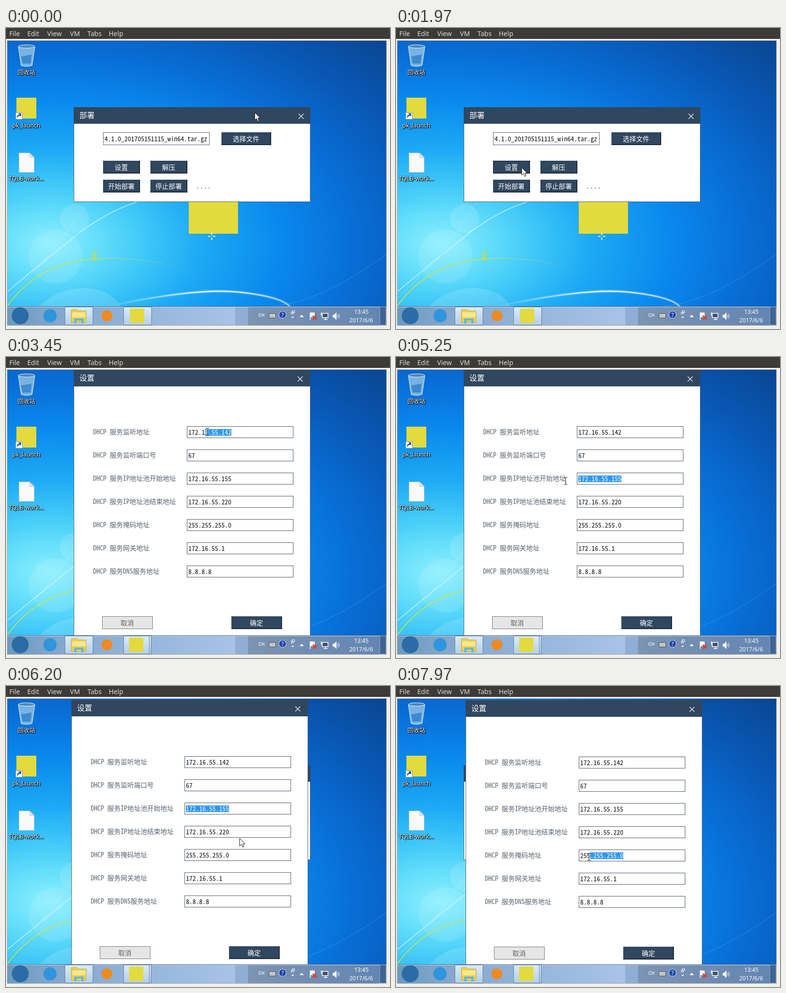
An HTML page for the animation above (8 s loop, 811 px wide and 635 px high).

```html
<!DOCTYPE html>
<html lang="zh-CN">
<head>
<meta charset="utf-8">
<title>部署</title>
<style>
html, body { margin: 0; width: 811px; height: 635px; overflow: hidden; background: #f1f0ee; }
svg { display: block; }
text { font: 14px "Noto Sans Mono CJK SC", "Noto Sans CJK SC", monospace; white-space: pre; }
.title { font-size: 16px; fill: #fff; }
.label { fill: #59636d; }
.value { fill: #111; }
.picked { fill: #fff; }
.mid { text-anchor: middle; }
.menu { font: 14px "Noto Sans", "Open Sans", sans-serif; fill: #dfdbd2; }
.icon { font: 12.5px "Noto Sans", "Noto Sans CJK SC", sans-serif; fill: #fff; text-anchor: middle; text-shadow: 1px 1px 1px #000, 1px 1px 2px #000, 0 0 2px #000; }
.clock { font: 12px "Noto Sans", "Open Sans", sans-serif; fill: #fff; text-anchor: middle; }
</style>
</head>
<body>
<svg id="stage" width="811" height="635" viewBox="0 0 811 635" xmlns="http://www.w3.org/2000/svg">
  <defs>
    <radialGradient id="sky" gradientUnits="userSpaceOnUse" cx="0" cy="0" r="620" gradientTransform="translate(92 455) scale(1.6 1)">
      <stop offset="0" stop-color="#8ceffd"/><stop offset=".1" stop-color="#66dffb"/>
      <stop offset=".2" stop-color="#40c9f8"/><stop offset=".32" stop-color="#1eaaf5"/>
      <stop offset=".48" stop-color="#0a8bee"/><stop offset=".64" stop-color="#086fd8"/>
      <stop offset=".82" stop-color="#0957b4"/><stop offset="1" stop-color="#0a4590"/>
    </radialGradient>
    <linearGradient id="bar">
      <stop offset="0" stop-color="#6d9abf"/><stop offset=".12" stop-color="#82a6cc"/>
      <stop offset=".4" stop-color="#98b8dd"/><stop offset=".6" stop-color="#a8c3e5"/>
    </linearGradient>
    <linearGradient id="tray"><stop offset="0" stop-color="#7d94b2"/><stop offset="1" stop-color="#6385b2"/></linearGradient>
    <linearGradient id="glass" x2="0" y2="1"><stop offset="0" stop-color="#dcebf7"/><stop offset="1" stop-color="#b2cfe9"/></linearGradient>
    <linearGradient id="fade"><stop offset="0" stop-color="#dbe63c"/><stop offset=".45" stop-color="#c8e05a"/><stop offset="1" stop-color="#7cc8e8" stop-opacity="0"/></linearGradient>
    <linearGradient id="glow"><stop offset="0" stop-color="#fff" stop-opacity="0"/><stop offset=".55" stop-color="#fff"/><stop offset="1" stop-color="#fff" stop-opacity=".6"/></linearGradient>
    <clipPath id="desk"><path d="M3 27H803V587H3Z"/></clipPath>
    <clipPath id="fileBox"><path d="M206 221H429V246H206Z"/></clipPath>
  </defs>

  <path fill="#f1f0ee" d="M0 0H811V635H0Z"/>
  <path fill="#3c3b37" d="M0 0H811V23H0Z"/>
  <g id="menu"></g>
  <path fill="none" stroke="#aaa8a4" d="M2.500 26.500H803.500V627.500H2.500Z"/>

  <g clip-path="url(#desk)">
    <path fill="url(#sky)" d="M3 27H803V587H3Z"/>
    <g fill="#fff">
      <circle cx="145" cy="402" r="31" opacity=".13"/>
      <circle cx="105" cy="482" r="57" opacity=".1"/>
      <path opacity=".14" d="M70 587Q110 548 165 549T242 587Z"/>
    </g>
    <g fill="none">
      <path d="M3 556Q70 500 145 440T300 360" stroke="#e4f9ff" stroke-width="1.500" opacity=".75"/>
      <path d="M3 570Q60 520 120 440T210 300" stroke="#e4f9ff" opacity=".3"/>
      <path d="M3 586Q70 494 187 487T400 518" stroke="url(#fade)" stroke-width="1.500"/>
      <g stroke="url(#glow)">
        <path d="M215 587Q400 548 490 557T600 588" stroke-width="7" opacity=".2"/>
        <path d="M215 587Q400 548 490 557T600 588" stroke-width="2.500"/>
      </g>
      <path d="M565 587Q660 580 803 478" stroke="#8fd0ff" opacity=".3"/>
      <path d="M187 470V494M180 475L194 490M194 474L180 489" stroke="#d5d93a" stroke-width="2" stroke-dasharray="4 2"/>
    </g>
    <path fill="#e3da3e" d="M386 332H490V434H386Z"/>
    <path stroke="#fff" stroke-width="2" d="M434.500 432V437M434.500 442V447M427 439.500H432M437 439.500H442"/>

    <path fill="#8dbfe6" fill-opacity=".85" stroke="#e9f5fc" d="M26 39H61L55 79Q43 83 32 79Z"/>
    <ellipse cx="43.500" cy="39" rx="17.500" ry="3.500" fill="#4f88bb" stroke="#eef8fd"/>
    <path fill="#2e7fcb" opacity=".8" d="M32 60L54 56 52 75H35Z"/>
    <path fill="#e3da3e" d="M22 147H64V191H22Z"/>
    <path fill="#fff" stroke="#889" d="M20.500 178.500H34.500V192.500H20.500Z"/>
    <path fill="#1d55a5" d="M23 190Q22 184 28 183L26 180H32V187L30 185Q25 186 23 190Z"/>
    <path fill="#fafafa" stroke="#b9c4cc" d="M27.500 263.500H50L59.500 273V304.500H27.500Z"/>
    <path fill="#dde3e8" stroke="#b9c4cc" d="M50 263.500V273H59.500Z"/>
    <text class="icon" x="43" y="98">回收站</text>
    <text class="icon" x="43" y="210">pk_launch</text>
    <text class="icon" x="43" y="322">TQLB-work...</text>

    <g id="main"></g>
    <g id="settings"></g>
  </g>

  <g id="taskbar">
    <path fill="url(#bar)" d="M3 587H803V627H3Z"/>
    <path fill="#90aed4" d="M484 588H511V627H484Z"/>
    <path fill="url(#tray)" d="M511 588H789V627H511Z"/>
    <path stroke="#c5d9ec" d="M3 588.500H803"/><path stroke="#4e6a8a" d="M3 587.500H803"/>
    <path fill="#3f648f" stroke="#8fabc9" d="M789.500 588.500H802.500V626.500H789.500Z"/>
    <circle cx="30" cy="607" r="18" fill="#2c6ca6"/>
    <circle cx="93" cy="607" r="14" fill="#2f95dc"/>
    <circle cx="213" cy="607" r="11.500" fill="#ee8a20"/>
    <path fill="url(#glass)" stroke="#5f7f9f" d="M124.500 588.500H183.500V626.500H124.500Z"/>
    <path fill="#ecd04c" stroke="#c9a637" d="M138 594H150L153 597H169V621H138Z"/>
    <path fill="#f8e88b" d="M140 600H168V610H140Z"/>
    <path fill="#65b4e4" d="M144 613H164V623H159V617H149V623H144Z"/>
    <g id="stack"><path fill="url(#glass)" stroke="#5f7f9f" d="M290 588.500H306.500V626.500H290Z"/></g>
    <path id="appButton" fill="url(#glass)" stroke="#5f7f9f"/>
    <path id="appIcon" fill="#e3da3e" d="M262 592H292V622H262Z"/>

    <text x="533" y="609" fill="#fff" style="font:11px 'Liberation Mono',monospace">CH</text>
    <path fill="#d8dde2" stroke="#444" d="M555.500 602.500H569.500V611.500H555.500Z"/>
    <path stroke="#555" stroke-dasharray="1 1" d="M557 605.500H568M557 608.500H568"/>
    <circle cx="584" cy="605" r="7.500" fill="#1d43a8" stroke="#d6e0f0"/>
    <text class="clock" x="584" y="609.500" font-weight="700">?</text>
    <path fill="none" stroke="#fff" d="M604.500 596.500H609.500V600.500H604.500ZM602.500 599.500H606.500V603.500H602.500Z"/>
    <path fill="#fff" d="M602.500 609H608.500L605.500 612ZM620 610H629L624.500 605Z"/>
    <path stroke="#fff" stroke-width="1.500" fill="#f5f5f5" d="M642.500 616V601H651V609H643"/>
    <path stroke="#df3c2c" stroke-width="3" d="M648 607L656 615M656 607L648 615"/>
    <path fill="#40536b" stroke="#fff" stroke-width="1.500" d="M668 602H680V611H668ZM671 615H679M675 611V615M666 600V607"/>
    <path fill="#fff" d="M690 605H693L698 600V616L693 611H690Z"/>
    <path fill="none" stroke="#fff" d="M700 605Q702 608 700 611M702 603Q705.500 608 702 613"/>
    <text class="clock" x="750.500" y="603">13:45</text>
    <text class="clock" x="750" y="621">2017/6/6</text>
  </g>

  <path id="arrow" fill="#fff" stroke="#111" d="M.5 .5V16.500L4 13 7 19 9.500 18 7 12H12Z"/>
  <g id="beam" fill="none">
    <path stroke="#fff" stroke-width="3" opacity=".6" d="M0-7V7"/>
    <path stroke="#111" d="M-3.500-7.500H-1L0-6.500 1-7.500H3.500M-3.500 7.500H-1L0 6.500 1 7.500H3.500M0-7V7"/>
  </g>
</svg>

<script>
const LOOP = 8000, NAVY = '#30475f', CHAR = 7;
const $ = id => document.getElementById(id);

const text = (x, y, s, cls, extra = '') => `<text x="${x}" y="${y}" class="${cls}" ${extra}>${s}</text>`;
const rect = (x, y, w, h, fill, extra = '') => `<rect x="${x}" y="${y}" width="${w}" height="${h}" fill="${fill}" ${extra}/>`;
const box = (x, y, w, h, fill, stroke) => rect(x + .5, y + .5, w - 1, h - 1, fill, `stroke="${stroke}"`);

function button(x, y, w, label) {
  return rect(x, y, w, 27, '#0c1722') + rect(x, y, w - 1, 26, '#223445') +
    rect(x, y, w - 2, 25, NAVY) + text(x + w / 2 - .5, y + 19, label, 'title mid', 'style="font-size:14px"');
}

function dialog(x, y, h, title, closeX) {
  return box(x, y, 500, h, '#fff', '#566472') + rect(x, y, 500, 35, NAVY) +
    text(x + 12, y + 23, title, 'title') +
    `<path stroke="#e8f2fa" stroke-width="1.300" d="M${closeX - 5} ${y + 14}l10.500 10.500m0-10.500l-10.500 10.500"/>`;
}

const fields = [
  ['监听地址', '172.16.55.142'], ['监听端口号', '67'], ['IP地址池开始地址', '172.16.55.155'],
  ['IP地址池结束地址', '172.16.55.220'], ['掩码地址', '255.255.255.0'],
  ['网关地址', '172.16.55.1'], ['DNS服务地址', '8.8.8.8']
];
const rowY = row => 146 + 49 * row;

$('menu').innerHTML = [['File', 7], ['Edit', 45], ['View', 87], ['VM', 135], ['Tabs', 172], ['Help', 217]]
  .map(([s, x]) => text(x, 17, s, 'menu')).join('');

$('main').innerHTML = dialog(143, 167, 200, '部署', 623) +
  box(205, 220, 225, 27, '#fff', '#566472') +
  `<g clip-path="url(#fileBox)">${text(201, 239, 'r4.1.0_201705151115_win64.tar.gz', 'value')}</g>` +
  button(455, 220, 105, '选择文件') + button(205, 280, 78, '设置') + button(305, 280, 78, '解压') +
  button(205, 320, 78, '开始部署') + button(305, 320, 78, '停止部署') +
  text(401, 339, '....', 'label', 'style="font-size:16px"') +
  `<g id="pressed">${box(205, 280, 78, 27, 'none', '#0c1722')}</g>`;

$('settings').innerHTML = dialog(143, 27, 610, '设置', 621) +
  fields.map(([name, value], i) => text(184, rowY(i) + 17, 'DHCP 服务' + name, 'label') +
    box(382, rowY(i), 225, 25, '#fff', '#4d5a67') + text(385, rowY(i) + 18, value, 'value')).join('') +
  '<g id="selection"></g>' +
  box(203, 547, 107, 27, '#e8e6e4', '#70777d') + text(256, 566, '取消', 'label mid') +
  button(476, 547, 107, '确定');

// Pointer and window paths: time, x, y
const pointerPath = [
  [0, 525, 178], [40, 525, 178], [110, 527, 190], [280, 512, 255], [440, 496, 303], [590, 496, 303],
  [620, 492, 299], [680, 501, 303], [940, 501, 303], [1160, 410, 310], [1350, 300, 302], [1470, 264, 294],
  [2900, 266, 293], [3050, 370, 215], [3230, 483, 157], [3450, 425, 157], [3760, 348, 156],
  [3900, 375, 185], [4150, 500, 262], [4240, 504, 264], [4340, 490, 261], [4540, 490, 261],
  [5250, 358, 261], [5340, 356, 261], [5390, 362, 263], [5740, 498, 319], [5780, 498, 319],
  [5960, 461, 318], [6070, 461, 318], [6160, 487, 320], [6290, 507, 323], [6370, 502, 322],
  [6440, 502, 322], [6680, 478, 306], [7110, 478, 306], [7380, 400, 307], [7600, 475, 340],
  [7720, 505, 358], [7810, 486, 360], [7890, 456, 360], [7970, 407, 360], [8000, 400, 360]
];
const windowPath = [[0, 0, 0], [5780, 0, 0], [5960, -37, -1], [6070, -37, -1], [6160, -11, 1], [6290, 9, 4], [6370, 4, 3]];

const selections = [
  { row: 0, down: 3230, drag: 3230, up: 3760, end: 4300 },
  { row: 2, down: 4300, drag: 4540, up: 5340, end: 6690 },
  { row: 3, down: 6690, drag: 7110, up: 7380, end: 7800 },
  { row: 4, down: 7800, drag: 7800, up: LOOP, end: LOOP }
];

function along(path, t) {
  const next = path.findIndex(p => p[0] > t);
  if (next < 0) return path[path.length - 1].slice(1);
  const [a, b] = [path[next - 1], path[next]];
  const k = (t - a[0]) / (b[0] - a[0]);
  return [a[1] + (b[1] - a[1]) * k, a[2] + (b[2] - a[2]) * k];
}

function drawSelection(sel, t, dx) {
  if (!sel) return '';
  const value = fields[sel.row][1], y = rowY(sel.row);
  const pointerX = along(pointerPath, Math.min(t, sel.up) - 12)[0];
  const column = Math.floor((pointerX - dx - 388) / CHAR);
  const start = t < sel.drag ? value.length : Math.max(0, Math.min(value.length, column));
  const x = 385 + start * CHAR;
  if (start === value.length) return rect(x, y + 6, 1, 14, '#111');
  return rect(x, y + 6, (value.length - start) * CHAR, 14, '#2f98f3') + text(x, y + 18, value.slice(start), 'picked');
}

const show = (id, on) => $(id).setAttribute('visibility', on ? 'visible' : 'hidden');

function render(t) {
  const [px, py] = along(pointerPath, t).map(Math.round);
  const [dx, dy] = along(windowPath, t).map(Math.round);

  const open = Math.max(0, Math.min(1, (t - 2100) / 220));
  const ease = 1 - (1 - open) ** 2, scale = .9 + .1 * ease;
  show('settings', open > 0);
  $('settings').setAttribute('opacity', ease);
  $('settings').setAttribute('transform', open < 1
    ? `translate(393 327) scale(${scale}) translate(-393 -327)` : `translate(${dx} ${dy})`);

  const sel = selections.find(s => t >= s.down && t < s.end);
  $('selection').innerHTML = drawSelection(sel, t, dx);

  const stacked = t >= 2200;
  show('pressed', t >= 1970 && t < 2110);
  show('stack', stacked);
  $('appButton').setAttribute('d', `M248.500 588.500H${stacked ? 302.5 : 307.5}V626.500H248.500Z`);
  $('appIcon').setAttribute('transform', `translate(${stacked ? -2 : 0} 0)`);

  const overField = open === 1 && px - dx > 382 && px - dx < 607 &&
    fields.some((_, i) => Math.abs(py - dy - rowY(i) - 12.5) < 12.5);
  const movingWindow = t > 5390 && t < 6600;
  const beam = !movingWindow && (overField || (sel && t < sel.up));
  show('beam', beam);
  show('arrow', !beam);
  $('beam').setAttribute('transform', `translate(${px + .5} ${py + .5})`);
  $('arrow').setAttribute('transform', `translate(${px} ${py})`);
}

const startTime = performance.now();
function tick() {
  render((performance.now() - startTime) % LOOP);
  requestAnimationFrame(tick);
}
tick();
</script>
</body>
</html>
```
